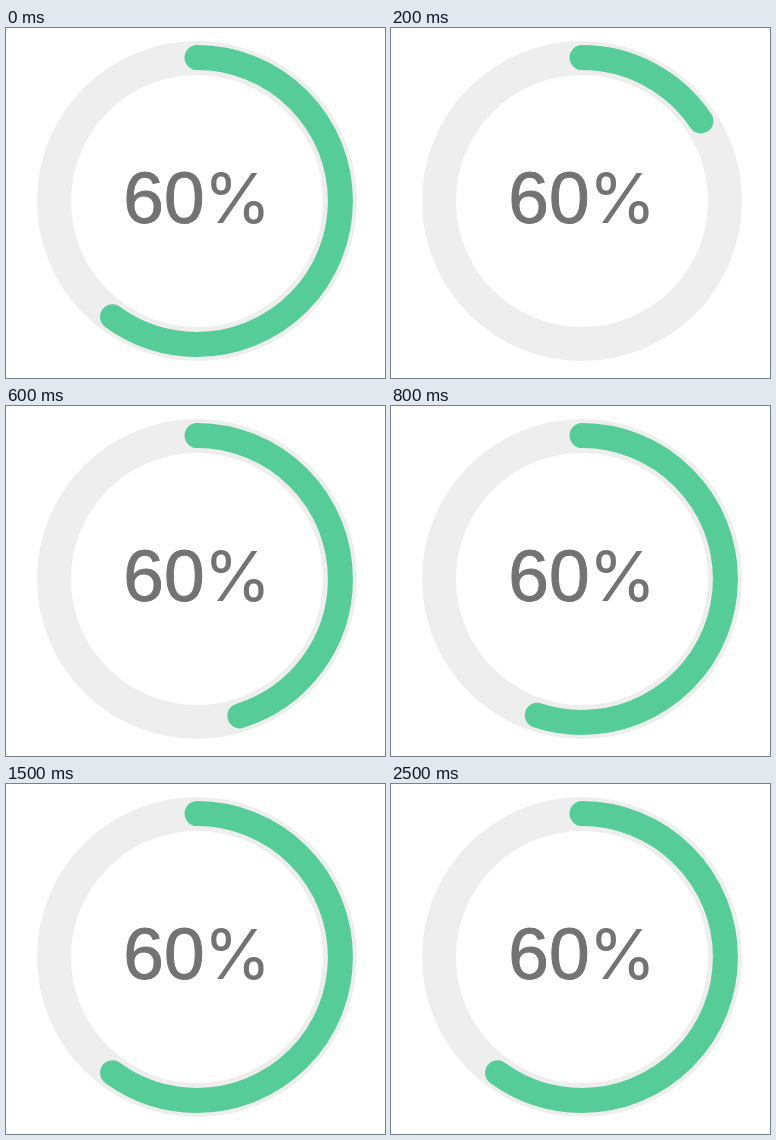
An HTML page that plays this animation: 379x350 px, repeating every 2800 ms.

```html
<!DOCTYPE html>
<html lang="en">
<head>
<meta charset="utf-8">
<title>Progress ring</title>
<style>
  html, body { margin: 0; width: 100%; height: 100%; overflow: hidden; background: #fff; }
  svg { display: block; }
  circle { fill: none; }
  .track { stroke: #eee; stroke-width: 34; }
  .bar { stroke: #56cd98; stroke-width: 25; stroke-linecap: round; }
  text { font: 73px "Liberation Sans", Arial, sans-serif; fill: #737375; stroke: #737375; stroke-width: 1; }
  .sign { font: 69px Inter, sans-serif; stroke: none; }
</style>
</head>
<body>
<svg width="379" height="350" viewBox="0 0 379 350">
  <circle class="track" cx="191" cy="173" r="143"/>
  <circle class="bar" cx="191" cy="173" r="143.4" transform="rotate(-90 191 173)"/>
  <text x="117.3" y="194.5">60<tspan class="sign" x="197.5">%</tspan></text>
</svg>
<script>
  const LOOP = 2800, STEP = 100, DELAY = 34, DURATION = 1000;
  const FULL = 0.6, GIRTH = 2 * Math.PI * 143.4;
  const bar = document.querySelector('.bar');

  // cubic-bezier(0, 0, .58, 1), solved by bisection
  function easeOut(x) {
    let lo = 0, hi = 1;
    for (let i = 0; i < 30; i++) {
      const s = (lo + hi) / 2;
      if (1.74 * s * s * (1 - s) + s ** 3 < x) lo = s; else hi = s;
    }
    return lo * lo * (3 - 2 * lo);
  }

  // The finished ring holds for the first step, then refills.
  function progress(ms) {
    const t = Math.floor((ms % LOOP) / STEP) * STEP;
    return t === 0 ? 1 : easeOut(Math.min(1, (t - DELAY) / DURATION));
  }

  function draw() {
    const length = GIRTH * FULL * progress(performance.now() - start);
    bar.setAttribute('stroke-dasharray', `${length.toFixed(2)} 2000`);
    requestAnimationFrame(draw);
  }

  const start = performance.now();
  draw();
</script>
</body>
</html>
```
